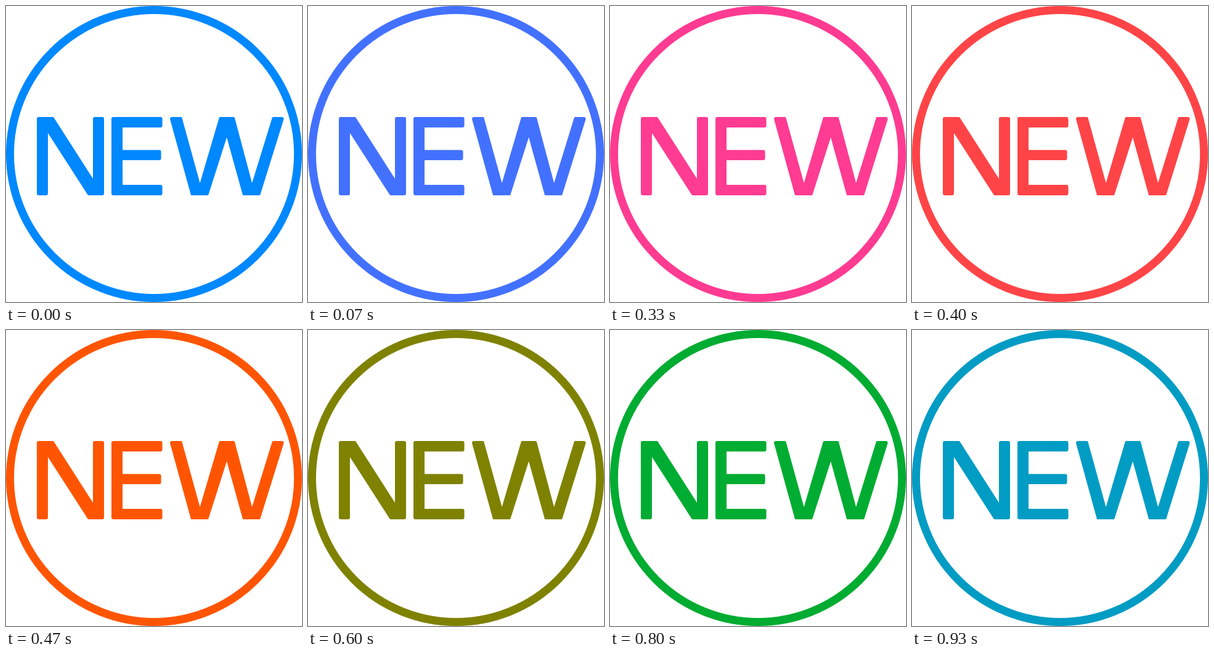
An HTML page with a canvas that plays this animation: 480x480 px, repeating every 990 ms.

```html
<!DOCTYPE html>
<html lang="en">
<head>
<meta charset="utf-8">
<title>New</title>
<style>
html, body { margin: 0; width: 100%; height: 100%; overflow: hidden; background: #fff; }
canvas { display: block; width: 480px; height: 480px; }
</style>
</head>
<body>
<canvas id="stage" width="480" height="480" role="img" aria-label="NEW"></canvas>
<script>
const ctx = document.getElementById('stage').getContext('2d');
const LOOP = 990, STEPS = 15;
const BASE = [0, 136, 255];
const TOP = 180, BOTTOM = 307, ROUND = 3;

// Start of each colour step, on a 10 ms clock
const starts = Array.from({ length: STEPS }, (_, i) => Math.round(i * 100 / STEPS) * 10);

// Points are [x, y, corner radius]
const letters = [
  [[50, TOP, ROUND], [77, TOP, 2], [141, 280], [141, TOP, ROUND], [159, TOP, ROUND],
   [159, BOTTOM, ROUND], [133, BOTTOM, 2], [68, 206], [68, BOTTOM, ROUND], [50, BOTTOM, ROUND]],
  [[171, TOP, ROUND], [253.5, TOP, ROUND], [253.5, 197, ROUND], [189, 197], [189, 233.5],
   [251.5, 233.5, ROUND], [251.5, 250, ROUND], [189, 250], [189, 290], [253.5, 290, ROUND],
   [253.5, BOTTOM, ROUND], [171, BOTTOM, ROUND]],
  [[265, TOP, ROUND], [285, TOP, 2], [314.5, 287], [346, TOP, 2], [370.5, TOP, 2],
   [399, 287], [432, TOP, 2], [451.5, TOP, ROUND], [412, BOTTOM, 1], [384, BOTTOM, 1],
   [358, 213], [328, BOTTOM, 1], [300, BOTTOM, 1]]
];

// Luminance-preserving hue rotation
function hueRotate([r, g, b], degrees) {
  const a = degrees * Math.PI / 180, c = Math.cos(a), s = Math.sin(a);
  const y = 0.213 * r + 0.715 * g + 0.072 * b;
  const spin = [
    -0.213 * r - 0.715 * g + 0.928 * b,
    0.143 * r + 0.140 * g - 0.283 * b,
    -0.787 * r + 0.715 * g + 0.072 * b
  ];
  const channels = [r, g, b].map((v, i) => Math.round(y + (v - y) * c + spin[i] * s));
  return `rgb(${channels.map(v => Math.max(0, Math.min(255, v))).join(',')})`;
}

function fillPolygon(points) {
  const last = points[points.length - 1];
  ctx.beginPath();
  ctx.moveTo((last[0] + points[0][0]) / 2, (last[1] + points[0][1]) / 2);
  points.forEach(([x, y, radius = 0], i) => {
    const next = points[(i + 1) % points.length];
    ctx.arcTo(x, y, next[0], next[1], radius);
  });
  ctx.closePath();
  ctx.fill();
}

function draw(time) {
  const t = time % LOOP;
  const step = starts.filter(start => start <= t).length - 1;
  const color = hueRotate(BASE, step * 360 / STEPS);

  ctx.fillStyle = '#fff';
  ctx.fillRect(0, 0, 480, 480);
  ctx.fillStyle = ctx.strokeStyle = color;
  ctx.lineWidth = 13;
  ctx.beginPath();
  ctx.arc(240, 240, 233.5, 0, Math.PI * 2);
  ctx.stroke();
  letters.forEach(fillPolygon);
}

const origin = performance.now();
function tick() {
  draw(performance.now() - origin);
  requestAnimationFrame(tick);
}
tick();
</script>
</body>
</html>
```
